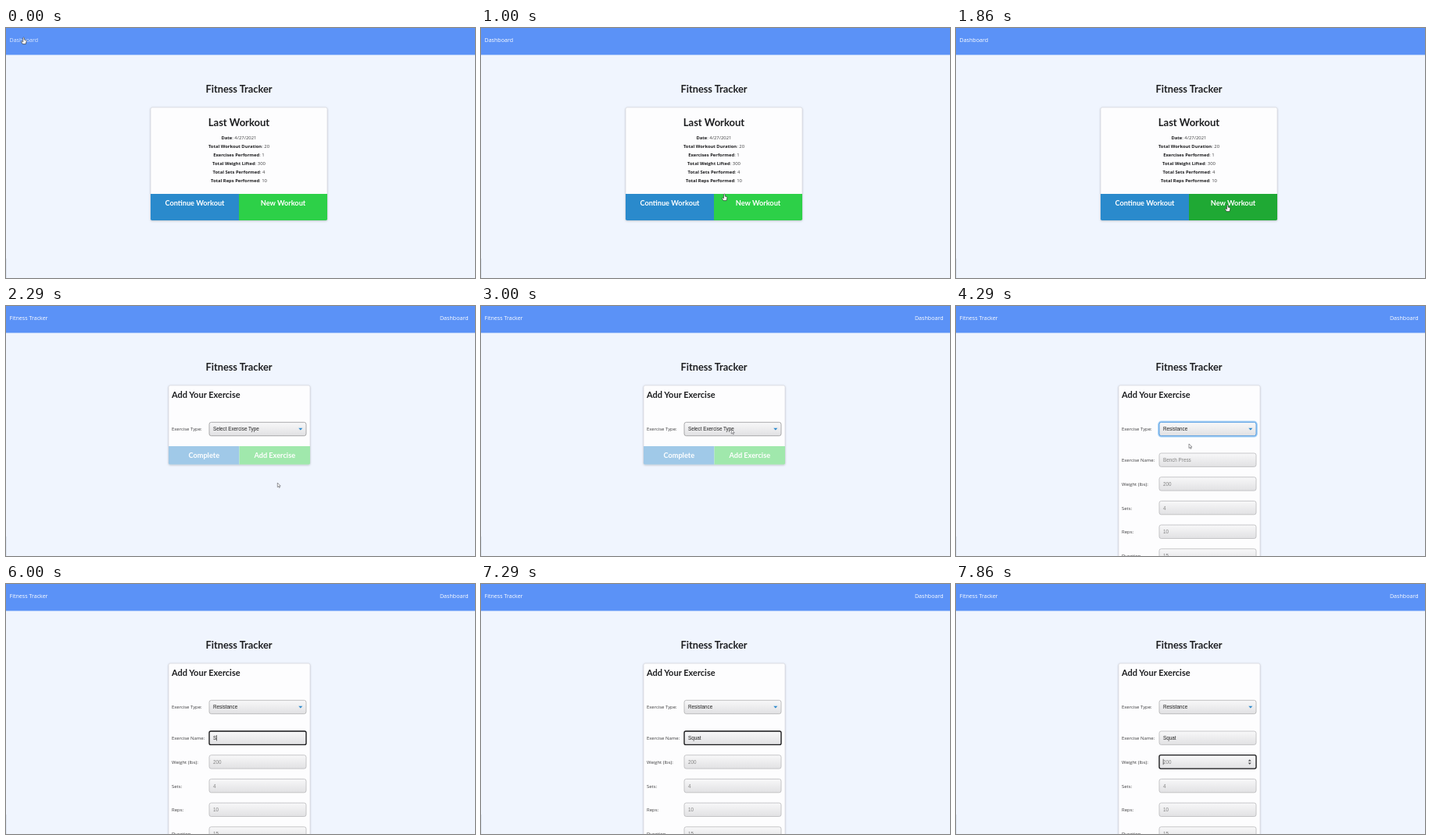
Recreate the animation shown at these times as an HTML page. Size 600x321 px, loop 8000 ms.

```html
<!DOCTYPE html>
<html lang="en">
<head>
<meta charset="utf-8">
<title>Fitness Tracker</title>
<style>
  html, body { margin: 0; width: 100%; height: 100%; overflow: hidden; background: #f0f5fe; }
  svg { display: block; width: 100vw; height: 100vh; }
  .ui { font: 5.95px "Open Sans", "Noto Sans", sans-serif; fill: #3c3c3e; }
  .nav { font-size: 7.1px; fill: #fff; }
  .bold { font-weight: 700; font-size: 5.8px; fill: #1c1c1e; }
  .head { font: 700 12.8px Lato, sans-serif; fill: #1d1e20; }
  .btn { font-size: 9.2px; fill: #fff; }
  .field { font: 6.3px "Liberation Sans", Arial, sans-serif; fill: #222; }
  .hint { fill: #858585; }
  .mid { text-anchor: middle; }
  .end { text-anchor: end; }
</style>
</head>
<body>
<svg id="stage" viewBox="0 0 600 321" preserveAspectRatio="none"></svg>
<script>
const LOOP = 8000, STEP = 1000 / 7;
const ROW = 30.7, NAME_Y = 189, FIELD_X = 260, TEXT_X = 265;

// Step numbers at which the interface changes
const HOVER_NEW = 8, FORM_PAGE = 16, OPEN_LIST = 24, PICK = 29,
      FOCUS_NAME = 36, FOCUS_WEIGHT = 52;
const KEYS = [42, 44, 45, 46, 47], WORD = "Squat";

// Pointer stops: time in ms, x, y
const PATH = [
  [140, 22.5, 12], [1000, 311.3, 213], [1290, 340, 224], [1710, 347.3, 227],
  [2290, 347.3, 227], [2860, 320.3, 158.5], [3430, 320.3, 158.5],
  [3860, 298, 177], [4570, 298, 177], [5000, 290, 194]
];

const rect = (x, y, w, h, fill, more = "") =>
  `<rect x="${x}" y="${y}" width="${w}" height="${h}" fill="${fill}" ${more}/>`;
const text = (x, y, cls, str, more = "") =>
  `<text x="${x}" y="${y}" class="${cls}" ${more}>${str}</text>`;
const group = (id, body) => `<g id="${id}">${body}</g>`;
const box = (y, more = "") =>
  rect(FIELD_X, y, 124, 17.4, "url(#shade)", `rx="2.6" stroke="#b9b9bb" stroke-width=".8" ${more}`);
const focusBox = (id, y) =>
  rect(FIELD_X, y, 124, 17.4, "none", `id="${id}" rx="2" stroke="#1a1a1c" stroke-width="1.3"`);
const card = (x, w, h) =>
  rect(x, 102, w, h, "#fdfdfe", 'rx="2" filter="url(#shadow)" stroke="#d4d6da" stroke-width=".6"');

// Two joined buttons along the bottom of a card
function buttons(x, y, w, h, left, right, colors, base) {
  const half = w / 2, r = 1.8, bottom = y + h;
  const shapes = [
    `M${x} ${y}h${half}v${h}H${x + r}Q${x} ${bottom} ${x} ${bottom - r}Z`,
    `M${x + half} ${y}h${half}v${h - r}Q${x + w} ${bottom} ${x + w - r} ${bottom}H${x + half}Z`
  ];
  return shapes.map((d, i) => `<path d="${d}" fill="${colors[i]}" ${i ? 'class="right"' : ""}/>`).join("") +
    text(x + half / 2, base, "head btn mid", left) +
    text(x + half * 1.5, base, "head btn mid", right);
}

const stats = [
  ["Date", "4/27/2021"], ["Total Workout Duration", 20], ["Exercises Performed", 1],
  ["Total Weight Lifted", 300], ["Total Sets Performed", 4], ["Total Reps Performed", 10]
].map(([label, value], i) =>
  text(298, 142.7 + 11 * i, "ui mid", `<tspan class="bold">${label}</tspan>: ${value}`)).join("");

const home = group("home",
  text(4.5, 17.5, "ui nav", "Dashboard", 'id="link"') +
  card(185, 226, 145) +
  text(298, 126.4, "head mid", "Last Workout", 'style="font-size:13px"') + stats +
  buttons(185, 213, 226, 34, "Continue Workout", "New Workout", ["#2a8acc", "#2dd048"], 228));

const rows = [
  ["Exercise Name:", ""], ["Weight (lbs):", "200"], ["Sets:", "4"], ["Reps:", "10"], ["Duration", "15"]
].map(([label, hint], i) => {
  const y = NAME_Y + ROW * i;
  return text(212, y + 11.3, "ui", label) + box(y) + text(TEXT_X, y + 11.1, "field hint", hint);
}).join("");

const details = group("details",
  card(208, 181, 240) + rows +
  text(TEXT_X, NAME_Y + 11.1, "field", "", 'id="name"') +
  focusBox("nameFocus", NAME_Y) +
  group("weightFocus", focusBox("ring", NAME_Y + ROW) +
    '<path d="M373.7 227.5h4l-2-2.3zM373.7 229.5h4l-2 2.3z" fill="#4a4a4c"/>') +
  rect(0, 0, .6, 7.4, "#222", 'id="caret"'));

const list = group("list",
  rect(FIELD_X, 167.3, 124, 27.4, "#fff", 'stroke="#8a8a8a" stroke-width=".6"') +
  rect(FIELD_X + .3, 0, 123.4, 9, "#1e78d7", 'id="mark"') +
  ["Select Exercise Type", "Resistance", "Cardio"].map((s, i) =>
    text(TEXT_X, 174.1 + 9 * i, "field option", s)).join(""));

const form = group("form",
  text(4.5, 17.5, "ui nav", "Fitness Tracker") +
  text(591.5, 17.5, "ui nav end", "Dashboard") +
  group("short", card(208, 181, 101.5) +
    buttons(208, 180, 181, 23.5, "Complete", "Add Exercise", ["#a0c9e8", "#a0e8ac"], 194.8)) +
  details +
  text(212, 117.6, "head", "Add Your Exercise", 'style="font-size:11px"') +
  text(212, 160.3, "ui", "Exercise Type:") +
  rect(259.2, 148.6, 125.6, 18.9, "none", 'id="glow" rx="3.4" stroke="#9fcdf6" stroke-width="2"') +
  box(149.3, 'id="select"') +
  text(TEXT_X, 160.2, "field", "", 'id="type"') +
  '<path d="M374.3 156.7h5l-2.5 2.9z" fill="#2a88cc"/>' + list);

const pointer = group("pointer",
  '<path id="arrow" d="M0 0V5.6L1.3 4.4 2.2 6.4 3.1 6 2.2 4.1H4Z" fill="#fff" stroke="#55555a" stroke-width=".6"/>' +
  '<path id="hand" d="M-.8 .7Q0-.5 .8 .7V3.1L3 3.7Q3.8 4 3.6 5L2.8 8.6H-1.2L-3 5.7Q-3 4.6-1.9 5L-.8 5.9Z" fill="#fff" stroke="#222" stroke-width=".6"/>' +
  '<path id="beam" d="M-1.3 0H1.3M0 0V8M-1.3 8H1.3" fill="none" stroke="#444" stroke-width=".6"/>');

document.getElementById("stage").innerHTML = `
  <defs>
    <linearGradient id="shade" x2="0" y2="1">
      <stop stop-color="#f8f8f9"/><stop offset="1" stop-color="#e1e1e3"/>
    </linearGradient>
    <filter id="shadow" x="-10%" y="-10%" width="120%" height="120%">
      <feDropShadow dx="0" dy=".7" stdDeviation="1" flood-color="#8c929c" flood-opacity=".5"/>
    </filter>
  </defs>` +
  rect(0, 0, 600, 321, "#f0f5fe") + rect(0, 0, 600, 34.5, "#5b92f7") +
  rect(0, 296, .8, 25, "#d9e1ed") +
  text(298, 83.4, "head mid", "Fitness Tracker") + home + form + pointer;

const $ = id => document.getElementById(id);
const show = (id, on) => $(id).style.display = on ? "" : "none";
const newButton = document.querySelector("#home .right");
const options = document.querySelectorAll(".option");

function pointerAt(t) {
  const next = PATH.findIndex(p => p[0] > t);
  if (next === 0) return PATH[0].slice(1);
  if (next < 0) return PATH[PATH.length - 1].slice(1);
  const [t0, x0, y0] = PATH[next - 1], [t1, x1, y1] = PATH[next];
  const u = (t - t0) / (t1 - t0), e = u * u * (3 - 2 * u);
  return [x0 + (x1 - x0) * e, y0 + (y1 - y0) * e];
}

function drawPointer(t, k) {
  const [x, y] = pointerAt(t), onHome = k < FORM_PAGE;
  const overLink = onHome && x < 42 && y < 20;
  const hand = overLink || (onHome && y > 212);
  const beam = k >= PICK && y > NAME_Y;
  $("pointer").setAttribute("transform", `translate(${x} ${y})`);
  show("pointer", k < KEYS[0]);
  show("hand", hand);
  show("beam", beam);
  show("arrow", !hand && !beam);
  $("link").style.opacity = overLink ? .8 : 1;
  return y;
}

function drawForm(k, mouseY) {
  const picked = k >= PICK, onName = k >= FOCUS_NAME && k < FOCUS_WEIGHT;
  const onSelect = k >= OPEN_LIST && k < FOCUS_NAME;
  show("short", !picked);
  show("details", picked);
  $("type").textContent = picked ? "Resistance" : "Select Exercise Type";
  show("glow", onSelect);
  $("select").setAttribute("stroke", onSelect ? "#3d8fdc" : picked ? "#b0b0b2" : "#98989a");

  show("list", k >= OPEN_LIST && !picked);
  const chosen = mouseY > 176.5 ? 1 : 0;
  $("mark").setAttribute("y", 167.5 + 9 * chosen);
  options.forEach((o, i) => o.style.fill = i === chosen ? "#fff" : "#222");

  const typed = KEYS.filter(key => k >= key).length;
  const name = $("name");
  name.textContent = typed ? WORD.slice(0, typed) : "Bench Press";
  name.setAttribute("class", typed ? "field" : "field hint");
  show("nameFocus", onName);
  show("weightFocus", k >= FOCUS_WEIGHT);

  // The caret blinks every half second after the latest action
  const last = Math.max(...[FOCUS_NAME, ...KEYS, FOCUS_WEIGHT].filter(n => n <= k));
  const lit = Math.floor((k - last) * STEP / 500) % 2 === 0;
  show("caret", k >= FOCUS_NAME && lit);
  const width = onName && typed && picked ? name.getComputedTextLength() + .2 : 0;
  $("caret").setAttribute("x", TEXT_X - .2 + width);
  $("caret").setAttribute("y", NAME_Y + 5 + (onName ? 0 : ROW));
}

function draw(now) {
  const k = Math.floor((now % LOOP + 5) / STEP) % 56;
  const mouseY = drawPointer(k * STEP, k);
  show("home", k < FORM_PAGE);
  show("form", k >= FORM_PAGE);
  newButton.setAttribute("fill", k >= HOVER_NEW ? "#1fa934" : "#2dd048");
  drawForm(k, mouseY);
}

let start;
function tick(now) {
  start ??= now;
  draw(now - start);
  requestAnimationFrame(tick);
}
draw(0);
requestAnimationFrame(tick);
</script>
</body>
</html>
```
